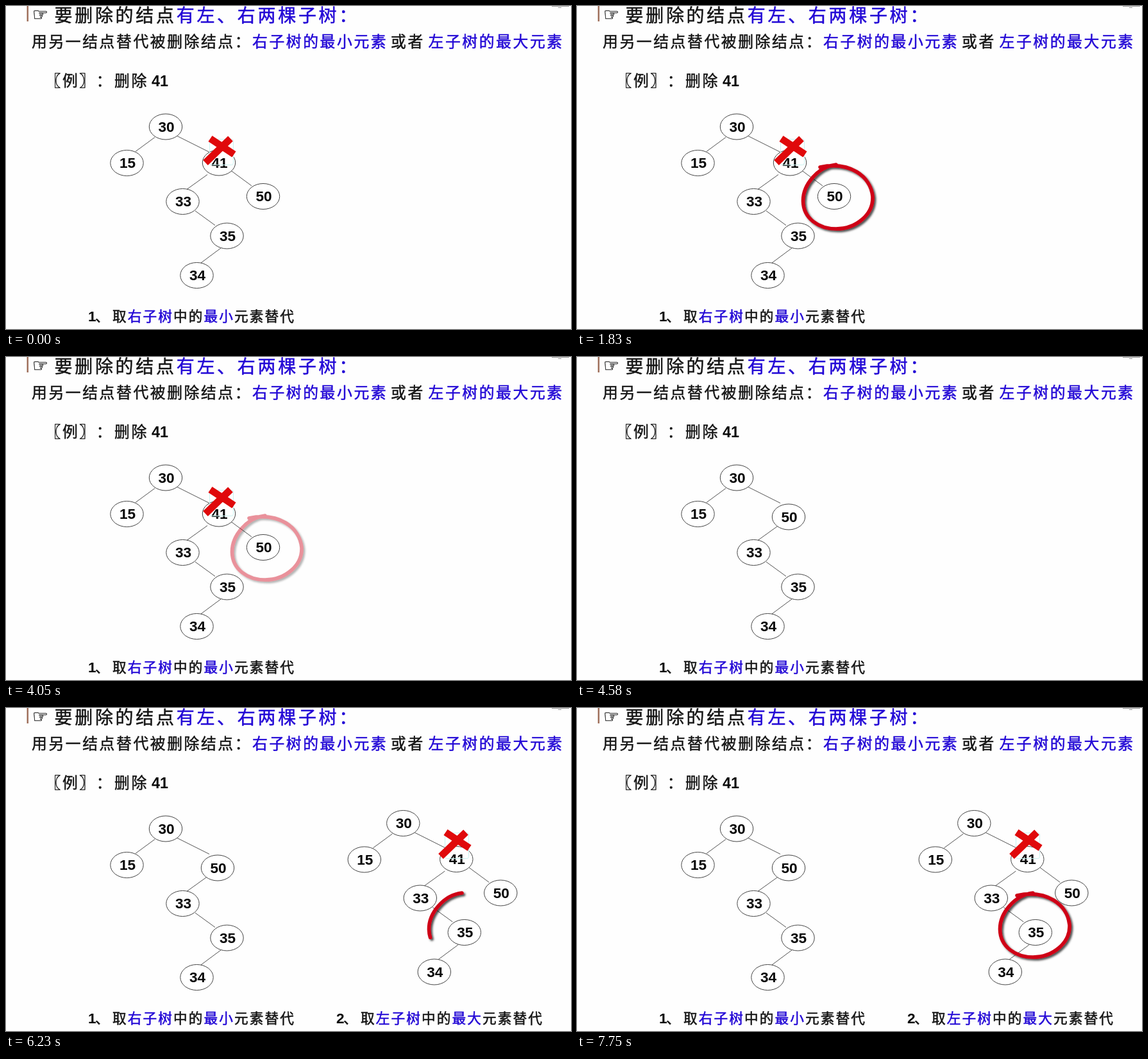
An HTML page that plays this animation: 881 by 503 pixels, repeating every 8 s.

```html
<!DOCTYPE html>
<html lang="zh-CN">
<head>
<meta charset="utf-8">
<style>
html, body { margin: 0; width: 100%; height: 100%; overflow: hidden; background: #fefefe; }
svg { display: block; width: 881px; height: 503px; }
text { font-family: "Noto Sans CJK SC", "Noto Sans CJK", sans-serif; font-weight: 500; fill: #151515; stroke: #151515; stroke-width: .5; white-space: pre; text-spacing-trim: space-all; }
.b { fill: #2308d6; stroke: #2308d6; }
.num { font: bold 22.6px "Liberation Sans", Arial, sans-serif; fill: #080808; stroke: none; }
.mid { text-anchor: middle; }
.head { font-size: 28px; letter-spacing: 3.7px; }
.sub { font-size: 23.8px; letter-spacing: 2.6px; }
.cap { font-size: 21.7px; letter-spacing: 2.05px; }
.hand { font: 28px "DejaVu Sans", sans-serif; fill: #333; stroke: #333; }
.node { fill: #fff; stroke: #444; stroke-width: 1; }
.edge { stroke: #555; stroke-width: 1; }
.ring { fill: none; stroke: #cf0414; stroke-width: 5.6; stroke-linecap: round; }
</style>
</head>
<body>
<svg viewBox="0 0 881 503">
  <defs>
    <filter id="shade" filterUnits="userSpaceOnUse" x="330" y="225" width="160" height="145">
      <feDropShadow dx="2.5" dy="2.5" stdDeviation="1.5" flood-color="#000" flood-opacity=".7"/>
    </filter>
  </defs>
  <rect x="32.5" width="2.5" height="24" fill="#a0705c"/>
  <path d="M851 .5H878M861 2.5H866" stroke="#999" fill="none"/>
  <text class="hand" x="41" y="23">☞</text>
  <text class="head" x="75.5" y="25">要删除的结点<tspan class="b">有左、右两棵子树：</tspan></text>
  <g class="sub">
    <text x="40" y="64">用另一结点替代被删除结点：</text>
    <text class="b" x="384" y="64">右子树的最小元素</text>
    <text x="600" y="64">或者</text>
    <text class="b" x="658.5" y="64">左子树的最大元素</text>
    <text x="61.5" y="124.5">〖例〗：</text>
    <text x="169" y="124.5">删除</text>
  </g>
  <text class="num" x="227" y="125" style="font-size:23.4px">41</text>
  <g id="stage"></g>
</svg>
<script>
const LOOP = 8000;
const SWAP = 4420, SECOND = 5170;
const DRAW = 1150;
const stage = document.getElementById("stage");

function add(parent, tag, attrs = {}, text) {
  const el = document.createElementNS("http://www.w3.org/2000/svg", tag);
  for (const key in attrs) el.setAttribute(key, attrs[key]);
  if (text !== undefined) el.textContent = text;
  parent.appendChild(el);
  return el;
}

const group = (parent, x = 0, y = 0) => add(parent, "g", { transform: `translate(${x} ${y})` });
const edge = (parent, d) => add(parent, "path", { class: "edge", d });

function node(parent, label, x, y) {
  add(parent, "ellipse", { class: "node", cx: x, cy: y, rx: 25.7, ry: 20 });
  add(parent, "text", { class: "num mid", x: x + 1, y: y + 7.7 }, label);
}

function caption(parent, n, x, side, size) {
  add(parent, "text", { class: "num", x, y: 491 }, n);
  const line = add(parent, "text", { class: "cap", x: x + 11, y: 491 });
  add(line, "tspan", {}, "、");
  add(line, "tspan", { x: x + 38 }, "取");
  add(line, "tspan", { class: "b" }, side + "子树");
  add(line, "tspan", {}, "中的");
  add(line, "tspan", { class: "b" }, "最" + size);
  add(line, "tspan", {}, "元素替代");
}

// Nodes shared by the tree before and after the deletion
function baseTree(parent) {
  edge(parent, "M232 204.5L202 226.5M267 202.5L317 227.5M314 262.5L282 285.5M295 319L326 341.5M335 377L304 400");
  node(parent, 30, 249, 188);
  node(parent, 15, 188.5, 244.5);
  node(parent, 33, 275.5, 304.5);
  node(parent, 35, 344.5, 358);
  node(parent, 34, 297.5, 419.5);
}

function doomedNodes(parent) {
  edge(parent, "M351 256.5L383 280");
  node(parent, 41, 332, 244);
  node(parent, 50, 401, 296.5);
}

function cross(parent) {
  add(parent, "rect", { x: 317.5, y: 207.5, width: 37, height: 40, rx: 3, fill: "none", stroke: "#c9f3f1" });
  add(parent, "path", { d: "M318.5 206.5L355.5 231M350 206.5L311 244", stroke: "#e0090b", "stroke-width": 11 });
}

function ring(parent) {
  const holder = add(parent, "g", { filter: "url(#shade)" });
  const line = add(holder, "path", {
    class: "ring", pathLength: 1,
    d: "M404 247C376 250 352 278 352.5 304C353 331 377 347 404 347C435 347 462 325 461 297C458 265 425 241 379 251"
  });
  return { holder, line };
}

const left = group(stage);
baseTree(left);
const before = group(left);
doomedNodes(before);
cross(before);
const after = group(left);
node(after, 50, 330, 249);
caption(stage, "1", 128, "右", "小");

const right = group(stage);
const rightTree = group(right, 370.3, -8.5);
baseTree(rightTree);
doomedNodes(rightTree);
cross(group(right, 367, -13));
caption(right, "2", 515, "左", "大");

const ringA = ring(group(stage));
const ringB = ring(group(stage, 307, 41));

const clamp = v => Math.min(1, Math.max(0, v));
const ease = p => p < .5 ? 2 * p * p : 1 - 2 * (1 - p) ** 2;
const show = (el, on) => el.setAttribute("display", on ? "inline" : "none");

function drawRing({ holder, line }, t, start, opacity) {
  const p = ease(clamp((t - start) / DRAW));
  show(holder, p > 0 && opacity > 0);
  holder.setAttribute("opacity", opacity);
  line.setAttribute("stroke-dasharray", p < 1 ? `${p} 2` : "none");
}

function render(t) {
  show(before, t < SWAP);
  show(after, t >= SWAP);
  show(right, t >= SECOND);
  drawRing(ringA, t, 545, 1 - clamp((t - 3600) / 780));
  drawRing(ringB, t, 5805, 1);
}

const origin = performance.now();
function tick() {
  render((performance.now() - origin) % LOOP);
  requestAnimationFrame(tick);
}
tick();
</script>
</body>
</html>
```
